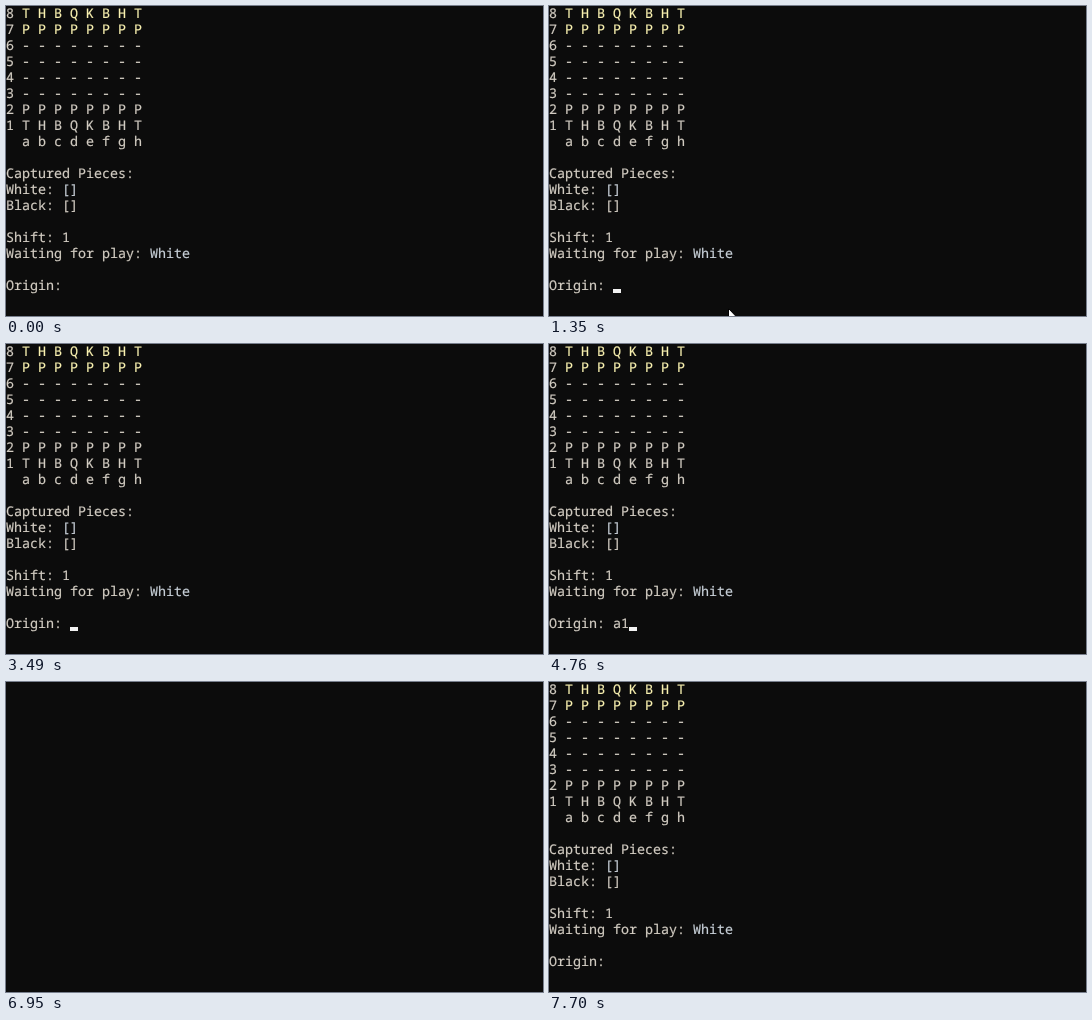
An HTML page for the animation above (8000 ms loop, 537 px wide and 310 px high).

```html
<!DOCTYPE html>
<html lang="en">
<head>
<meta charset="utf-8">
<title>Console chess</title>
<style>
  html, body { margin: 0; width: 100%; height: 100%; overflow: hidden; background: #0c0c0c; }
  svg { display: block; width: 537px; height: 310px; }
  text {
    font: 13.3333px "Noto Sans Mono", "DejaVu Sans Mono", monospace;
    fill: #d2ccc2;
    stroke: #d2ccc2;
    stroke-width: .2px;
    white-space: pre;
    text-rendering: geometricPrecision;
  }
  .black { fill: #f9f1b0; stroke: #f9f1b0; }
  .cool { fill: #c6ced6; stroke: #c6ced6; }
</style>
</head>
<body>
<svg viewBox="0 0 537 310">
  <rect width="537" height="310" fill="#0c0c0c"/>
  <g id="screen"></g>
  <rect id="caret" width="8" height="4" fill="#f2f2f2"/>
  <path id="mouse" d="M.5 .5V16.5L4.2 13 6.6 18.5 9 17.5 6.6 12H11.5Z" fill="#fff" stroke="#000"/>
</svg>
<script>
const LOOP = 8000, BLINK = 535, STEP = 68, COL = 8, ROW = 16;
const PROMPT_COL = 8, PROMPT_ROW = 17;
const $ = id => document.getElementById(id);
const screen = $('screen'), caret = $('caret'), mouse = $('mouse');

// Each line is a list of [text, class] runs.
const officers = ' T H B Q K B H T', pawns = ' P'.repeat(8);
const empty = ' -'.repeat(8);
const lines = [
  [['8'], [officers, 'black']],
  [['7'], [pawns, 'black']],
  ...[6, 5, 4, 3].map(n => [[n + empty]]),
  [['2' + pawns]],
  [['1' + officers]],
  [['  a b c d e f g h']],
  [],
  [['Captured Pieces:']],
  [['White: '], ['[]', 'cool']],
  [['Black: []']],
  [],
  [['Shift: 1']],
  [['Waiting for play: '], ['White', 'cool']],
  [],
  [['Origin: ']]
];

function addText(content, col, row, cls) {
  const el = document.createElementNS('http://www.w3.org/2000/svg', 'text');
  el.setAttribute('x', col * COL);
  el.setAttribute('y', row * ROW + 12);
  if (cls) el.setAttribute('class', cls);
  el.textContent = content;
  screen.append(el);
  return el;
}

lines.forEach((runs, row) => {
  let col = 0;
  for (const [content, cls] of runs) {
    addText(content, col, row, cls);
    col += content.length;
  }
});
const input = addText('', PROMPT_COL, PROMPT_ROW);
const message = addText("There isn't any possible movements for the chosen piece", 0, PROMPT_ROW + 1);

// What the console does; the caret blinks from `blink` on.
const stages = [
  { from: 0, typed: '' },
  { from: 1350, typed: '', blink: 1350 },
  { from: 3890, typed: 'a', blink: 3960 },
  { from: 4760, typed: 'a1', blink: 4490 },
  { from: 5230, typed: 'a1', blink: 5230, entered: true },
  { from: 5290, typed: 'a1', error: true },
  { from: 6950, typed: '', cleared: true },
  { from: 7020, typed: '', blink: 7165 }
];

const show = (el, on) => { el.style.display = on ? '' : 'none'; };
const move = (el, x, y) => el.setAttribute('transform', `translate(${x} ${y})`);
const mix = (a, b, u) => a + (b - a) * u;

// Three sweeps of the pointer; null while it is away.
function pointer(t) {
  const progress = (from, steps) => Math.min(1, Math.floor((t - from) / STEP) / steps);
  if (t >= 390 && t < 670) {
    const u = progress(390, 3);
    return [mix(132, 113, u), mix(302, 282, u)];
  }
  if (t >= 810 && t < 1010) {
    const u = progress(810, 1);
    return [mix(112, 100, u), mix(273, 268, u)];
  }
  if (t >= 1010 && t < 1760) {
    // Up, then down to the bottom edge and along it.
    const u = progress(1010, 11), dip = Math.min(1, u * 11 / 5);
    return [mix(100, 457, u ** 1.91), 263.5 - 38.5 * Math.sin(dip * Math.PI * 1.5)];
  }
  return null;
}

function draw(t) {
  const stage = stages.findLast(s => s.from <= t);
  show(screen, !stage.cleared);
  show(message, stage.error);
  input.textContent = stage.typed;

  const beat = Math.max(0, Math.floor((t - stage.blink) / BLINK));
  show(caret, beat % 2 === 0);
  const col = stage.entered ? 0 : PROMPT_COL + stage.typed.length;
  const row = PROMPT_ROW + (stage.entered ? 1 : 0);
  move(caret, col * COL, row * ROW + 11);

  const tip = pointer(t);
  show(mouse, tip);
  if (tip) move(mouse, ...tip.map(Math.round));
}

const start = performance.now();
function tick() {
  draw((performance.now() - start) % LOOP);
  requestAnimationFrame(tick);
}
tick();
</script>
</body>
</html>
```
